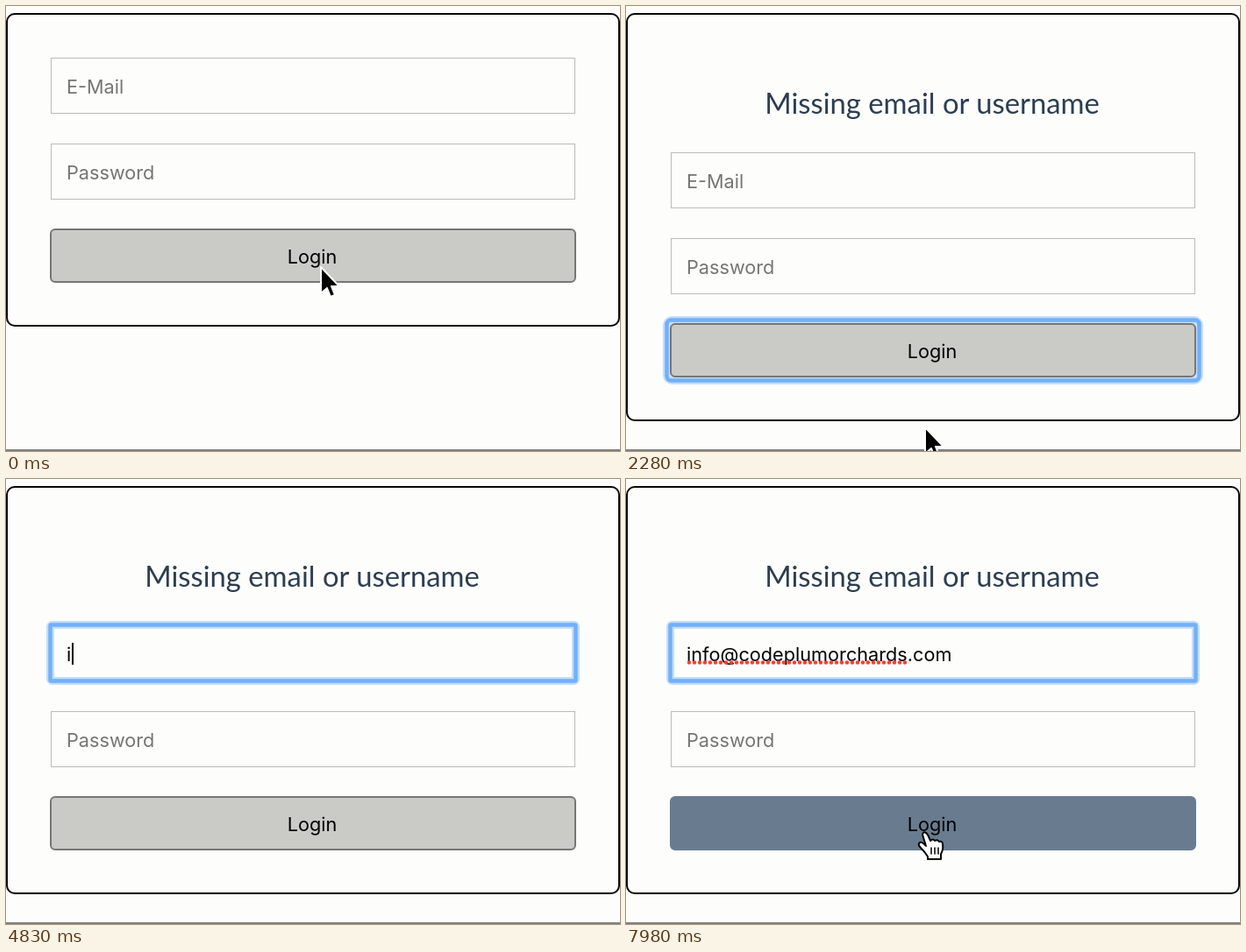
These frames come from a looping animation (700x508 px, 8000 ms). An HTML page:

```html
<!DOCTYPE html>
<html lang="en">
<head>
<meta charset="utf-8">
<title>Login form</title>
<style>
  html, body { margin: 0; width: 100%; height: 100%; overflow: hidden; background: #fdfdfc; }
  svg { display: block; width: 700px; height: 508px; }
  text { font: 21.7px Inter, "Liberation Sans", sans-serif; white-space: pre; }
  .title { font: 32.8px Lato, "Open Sans", sans-serif; fill: #2c3e50; text-anchor: middle; }
  .hint { fill: #757575; }
  .field { fill: none; stroke: #bbb; }
  .ring rect { fill: none; stroke: #72b0f8; }
  .ring .glow { stroke-width: 9; opacity: .4; }
  .ring .band { stroke-width: 4.5; }
  .pointer { stroke-linejoin: round; stroke-linecap: round; }
  .button { fill: #cacac6; stroke: #767676; stroke-width: 2; }
  .button.hover { fill: #697c8f; stroke: #697c8f; }
</style>
</head>
<body>
<svg viewBox="0 0 700 508">
  <rect id="card" x="1" y="9" width="698" rx="9" fill="none" stroke="#000" stroke-width="2"/>
  <path d="M0 507H700" stroke="#808080" stroke-width="2"/>
  <text id="title" class="title" x="349" y="123">Missing email or username</text>

  <g id="form">
    <rect class="field" x="51.5" y="59.5" width="597" height="63"/>
    <g id="mailRing" class="ring">
      <rect class="glow" x="50.5" y="58.5" width="599" height="64" rx="2"/>
      <rect class="band" x="50.5" y="58.5" width="599" height="64" rx="1"/>
    </g>
    <text id="hint" class="hint" x="69" y="100">E-Mail</text>
    <text id="mail" x="69" y="100"></text>
    <path id="squiggle" stroke="#ff3b30" stroke-width="4.4" stroke-linecap="round" stroke-dasharray="0 6"/>
    <rect id="caret" y="79" width="2" height="25"/>

    <rect class="field" x="51.5" y="157.5" width="597" height="63"/>
    <text class="hint" x="69" y="198">Password</text>

    <g id="buttonRing" class="ring">
      <rect class="glow" x="46.5" y="250.5" width="607" height="69" rx="6"/>
      <rect class="band" x="46.5" y="250.5" width="607" height="69" rx="5"/>
    </g>
    <rect id="button" class="button" x="51" y="255" width="598" height="60" rx="5"/>
    <text x="349" y="294" text-anchor="middle">Login</text>
  </g>

  <g id="loading">
    <rect x="2" y="10" width="696" height="354" rx="8" fill="rgba(0,0,0,.3)"/>
    <g id="spinner"></g>
  </g>

  <g id="pointer" class="pointer">
    <path id="arrow" d="M1 1V31L8 25L12 35L17 33L13 23H22Z" stroke="#fff" stroke-width="2"/>
    <g id="beam" fill="none">
      <path d="M-6 -15Q0 -15 0 -10V10Q0 15 -6 15M6 -15Q0 -15 0 -10V10Q0 15 6 15M-2.5 1H2.5" stroke="#fff" stroke-width="4"/>
      <path d="M-6 -15Q0 -15 0 -10V10Q0 15 -6 15M6 -15Q0 -15 0 -10V10Q0 15 6 15M-2.5 1H2.5" stroke="#000" stroke-width="2"/>
    </g>
    <g id="hand">
      <path d="M-2 3Q-1 -1 2 1Q4 2 7 10Q10 7 12 10Q15 8 17 11Q21 10 21 14Q22 20 19 25V31H4V28Q1 23 -4 18Q-8 14 -5 12Q-2 11 2 16Z" fill="#fff" stroke="#000" stroke-width="2"/>
      <path d="M8 18V25M12 18V25M16 18V25" stroke="#000" stroke-width="1.5"/>
    </g>
  </g>
</svg>
<script>
const LOOP = 8000;
const ADDRESS = "info@codeplumorchards.com";
const SHIFT = 108;
const LOAD_START = 750, LOAD_END = 1750, MAIL_FOCUS = 3100;
const TYPE_START = 4800, TYPE_FAST = 6924, TYPE_END = 7434;
// time, x, y
const PATH = [[0, 358, 297], [300, 358, 297], [650, 374, 278], [1800, 374, 278], [2200, 340, 480],
  [2450, 340, 480], [3000, 271, 208], [7550, 271, 208], [7900, 340, 403], [LOOP, 340, 403]];
const DOTS = ["#1c1c1c", "#444", "#777", "#a2a2a2", "#b8b8b8", "#bebebe", "#bebebe",
  "#bebebe", "#c4c4c4", "#d2d2d2", "#e4e4e4", "#f8f8f8"];

const el = {};
document.querySelectorAll("[id]").forEach(node => el[node.id] = node);
const show = (node, on) => node.setAttribute("visibility", on ? "visible" : "hidden");
const inside = (v, low, high) => v >= low && v < high;

const dots = DOTS.map((_, i) => {
  const dot = document.createElementNS("http://www.w3.org/2000/svg", "circle");
  const angle = (i / 6 - .5) * Math.PI;
  dot.setAttribute("cx", 350 + 20.5 * Math.cos(angle));
  dot.setAttribute("cy", 188.5 + 20.5 * Math.sin(angle));
  dot.setAttribute("r", 3.7);
  return el.spinner.appendChild(dot);
});

function pointerAt(t) {
  const i = PATH.findIndex(p => p[0] > t);
  const [t0, x0, y0] = PATH[i - 1], [t1, x1, y1] = PATH[i];
  const u = (t - t0) / (t1 - t0), e = u * u * (3 - 2 * u);
  return [x0 + (x1 - x0) * e, y0 + (y1 - y0) * e];
}

function pointerKind(t, x, y) {
  if (t < 300 || inside(t, LOAD_START, LOAD_END) || !inside(x, 50, 650)) return "arrow";
  if (inside(y, 254, 316)) return "hand";
  return inside(y, 59, 123) || inside(y, 157, 221) ? "beam" : "arrow";
}

function typedCount(t) {
  if (t < TYPE_START) return 0;
  if (t < TYPE_FAST) return 1 + Math.floor((t - TYPE_START) / 118);
  return Math.min(ADDRESS.length, 19 + Math.floor((t - TYPE_FAST) / 85));
}

function caretOn(t) {
  if (t < MAIL_FOCUS) return false;
  if (inside(t, TYPE_START, TYPE_END)) return true;
  const since = t < TYPE_START ? t - MAIL_FOCUS + 100 : t - TYPE_END;
  return since % 1000 < 500;
}

function draw(t) {
  const failed = t >= LOAD_END;
  const shift = failed ? SHIFT : 0;
  el.card.setAttribute("height", 356 + shift);
  el.form.setAttribute("transform", `translate(0 ${shift})`);
  show(el.title, failed);
  show(el.buttonRing, inside(t, LOAD_START - 30, MAIL_FOCUS));
  show(el.mailRing, t >= MAIL_FOCUS);

  const count = typedCount(t);
  el.mail.textContent = ADDRESS.slice(0, count);
  show(el.hint, !count);
  const width = count ? el.mail.getComputedTextLength() : 0;
  el.caret.setAttribute("x", Math.round(69.5 + width));
  show(el.caret, caretOn(t));

  const dotAt = ADDRESS.indexOf(".");
  const marked = count > dotAt;
  if (marked) el.squiggle.setAttribute("d", `M72 101.5H${67 + el.mail.getSubStringLength(0, dotAt)}`);
  show(el.squiggle, marked);

  show(el.loading, inside(t, LOAD_START, LOAD_END));
  const head = Math.floor((t - LOAD_START) * 12 / 1000);
  dots.forEach((dot, i) => dot.setAttribute("fill", DOTS[(((head - i) % 12) + 12) % 12]));

  const [x, y] = pointerAt(t);
  const kind = pointerKind(t, x, y - shift);
  const visible = !inside(t, TYPE_START, 7550);
  el.pointer.setAttribute("transform", `translate(${x} ${y})`);
  for (const name of ["arrow", "beam", "hand"]) show(el[name], visible && name === kind);
  el.button.classList.toggle("hover", kind === "hand");
}

function tick(now) {
  draw(now % LOOP);
  requestAnimationFrame(tick);
}
draw(0);
requestAnimationFrame(tick);
</script>
</body>
</html>
```
